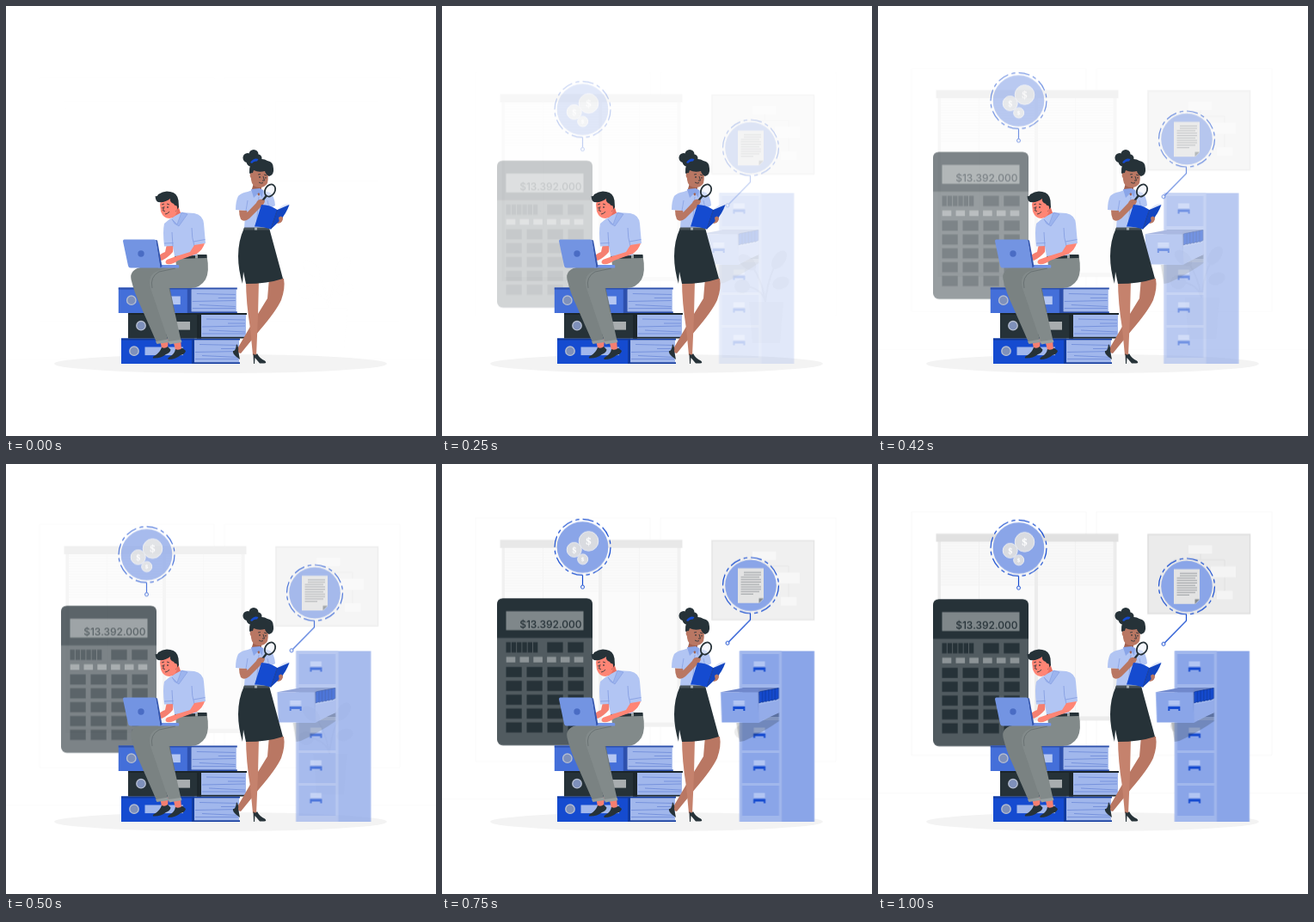
An HTML page that plays this animation: 500x500 px, repeating every 1040 ms.

```html
<!DOCTYPE html>
<html lang="en">
<head>
<meta charset="utf-8">
<title>Accounting office</title>
<style>
  html, body { margin: 0; width: 100%; height: 100%; overflow: hidden; background: #fff; }
  svg { display: block; width: 100vw; height: 100vh; }
  .slide { opacity: 0; }
  .sum { font: 500 12px Inter, "Open Sans", sans-serif; fill: #263238; }
  .coin { font-family: "Noto Serif", "Liberation Serif", serif; font-weight: 600; fill: #fff; text-anchor: middle; }
</style>
</head>
<body>
<svg viewBox="0 0 500 500">
  <g id="room" class="slide">
    <g fill="none" stroke="#f6f6f6" stroke-width=".8">
      <path d="M39 55H242V338H39ZM254 55H458V338H254ZM0 382H500"/>
    </g>
    <rect x="69.5" y="88" width="208" height="210" fill="#ececec"/>
    <path d="M73 90H182V293H73ZM186 90H273.500V293H186Z" fill="#fafafa"/>
    <path d="M117.500 90V293M229.500 90V293" stroke="#f1f1f1"/>
    <g id="blinds" stroke="#f0f0f0" stroke-width=".8"></g>
    <rect x="67.500" y="80.500" width="212" height="9.500" fill="#e1e1e1"/>
    <rect x="314" y="81.500" width="118.500" height="92" fill="#ebebeb" stroke="#dedede" stroke-width="1.500"/>
    <path d="M375 104V111H403V147M375 111H344V124" fill="none" stroke="#e0e0e0"/>
    <path d="M361 94H388.500V104H361ZM387 118.500H416V131.500H387ZM394 147H412.500V157H394Z" fill="#f4f4f4"/>
    <g fill="#e6e6e6">
      <path d="M357 322H397L393 370H361Z" fill="#f0f0f0"/>
      <path d="M376 322Q371 288 350 268M376 322Q380 285 396 266M376 322Q372 304 346 303" fill="none" stroke="#e6e6e6" stroke-width="2"/>
      <ellipse cx="349" cy="304" rx="9" ry="8"/>
      <ellipse cx="355" cy="276" rx="12" ry="7" transform="rotate(40 355 276)"/>
      <ellipse cx="392" cy="273" rx="12" ry="7" transform="rotate(-55 392 273)"/>
      <ellipse cx="394" cy="300" rx="10" ry="7" transform="rotate(-20 394 300)"/>
    </g>
  </g>

  <ellipse cx="249.500" cy="416" rx="193.500" ry="11" fill="#f3f3f3"/>

  <g id="calc" class="slide">
    <rect x="64" y="157.500" width="111" height="171" rx="7" fill="#515b60"/>
    <path d="M64 203.500V164.500Q64 157.500 71 157.500H168Q175 157.500 175 164.500V203.500Z" fill="#263238"/>
    <rect x="74.500" y="172.500" width="90" height="22" fill="#7f878a"/>
    <text class="sum" x="162.500" y="192" text-anchor="end">$13.392.000</text>
    <g id="keys" fill="#263238"></g>
  </g>

  <g id="cabinet" class="slide">
    <rect x="344.700" y="217.500" width="87" height="198.500" fill="#8aa5e8"/>
    <rect x="344.700" y="217.500" width="49" height="198.500" fill="#a1b7ec"/>
    <g id="drawers"></g>
    <path d="M348 260H390.500V294H348Z" fill="#6f86c4"/>
    <path d="M344.700 323L341 301H367L390.500 288V299Q372 312 350 322Z" fill="#263238" opacity=".25"/>
    <path d="M367 269L390.500 260.500V289L367 300Z" fill="#a1b7ec"/>
    <path d="M367 300L390.500 289V275L367 280Z" fill="#94ace9"/>
    <g id="files" fill="#154bd0" stroke="#0f3798" stroke-width=".7"></g>
    <path d="M322.700 265.300H366L367.500 300.500H324Z" fill="#8aa5e8"/>
    <path d="M322.700 265.300L348 260.500H368L366 265.300Z" fill="#7088cc"/>
    <g id="openPull"></g>
  </g>

  <g id="folders"></g>

  <g id="man">
    <path d="M179 388L189 387L188 398H181ZM194 388L203 387L204 400H197Z" fill="#f57f70"/>
    <path d="M181 397Q185 399 188 396L191.500 399.500Q191 403 186 405Q180 410 171 409.500Q170 408 173 406.500Q179 403 181 397ZM197 399Q201 401 205 397.500L209 401Q208 405 203 406Q197 411 189 411Q187 410 190 408Q196 405 197 399Z" fill="#263238"/>
    <path d="M200 303L160 303Q143 306 145.500 318Q149 333 157 350L175 391L188 389L180 350L184 326H215Z" fill="#7a8282"/>
    <path d="M174 390L188.500 387.500L189 391L175.500 393Z" fill="#949b9b"/>
    <path d="M197 292L233.500 290Q237 309 232 318Q226 328 214 328H190L203.500 389L189.500 391.500L168 328Q164 312 177 308Q188 303 198 303Z" fill="#828a8a"/>
    <path d="M188.500 390L203.500 388L204.500 391L190 393.500Z" fill="#9aa1a1"/>
    <path d="M190 328L196 356M170 328Q167 315 178 309L197 305" fill="none" stroke="#646d6e" stroke-width=".8"/>
    <path d="M196 289H233.500V293L196.500 294Z" fill="#263238"/>
    <path d="M220 288.500H223V293.500H220Z" fill="#9aa1a1"/>
    <path d="M191 237L200 232L205 246L200 254L194 249Z" fill="#e96f62"/>
    <path d="M195 276L194 286Q188 293 181 296L176 293Q179 288 185 286L187 277Z" fill="#f57f70"/>
    <path d="M190 248Q198 243 204 240L219 241Q229 243 230 253L232 276L219 279L222 290L196 291L194 279L184 279.500Q182 262 184 253Z" fill="#b2c5f3"/>
    <path d="M194 279.500L193 263M184 276L194.500 275.500M216 258Q216 270 219 279M218 274L231.500 271.500" fill="none" stroke="#829be0" stroke-width=".8"/>
    <path d="M193 248L199 254L204 240L211 242L201 256L196 253Z" fill="#9cb4ee" stroke="#829be0" stroke-width=".6"/>
    <path d="M219 278L231 276Q229 283 222 288L200 296Q194 301 187 300Q184 298 187 295L198 291L214 286Z" fill="#ff8575"/>
    <path d="M179 231Q179 226 186 224L197 224L199 237Q198 246 190 247Q183 247 180 239Z" fill="#ff8575"/>
    <path d="M173.500 221Q176 222 177 219Q184 214 191 216Q199 217 200.500 226L201 234L197 239Q198 234 195 230Q190 228 191 224Q185 229 177 228Q174 227 173.500 221Z" fill="#263238"/>
    <ellipse cx="196.500" cy="235" rx="2.600" ry="3.200" fill="#ff8575"/>
    <path d="M181 231L184 230M187 230L190 231M184 233L182.500 238L185 238.500M185 242Q188 242 190 239" fill="none" stroke="#263238" stroke-width=".8"/>
    <path d="M188 233V235M182 234V235.500" stroke="#263238" stroke-width="1.100"/>
    <path d="M177 304.500L180 301H200Q202 301 201 304.500Z" fill="#7394e8"/>
    <path d="M174 272L176 272.500L181.500 303L179 304.500Z" fill="#3556ad"/>
    <path d="M137.500 271.500H172.500Q174 271.500 174.500 273L179.500 304.500H145Q142.500 304.500 142 302L136 273.500Q136 271.500 137.500 271.500Z" fill="#7394e2"/>
    <circle cx="157" cy="288" r="3.700" fill="#4a6cc4"/>
  </g>

  <g id="woman">
    <path d="M306 316L323 317Q325 328 320 342Q314 355 295 377L273 404L267 402L285 371L304 340Z" fill="#b97763"/>
    <path d="M279 318H294L293 360L291 407L287 406L284 375Q279 345 279 318Z" fill="#c5826d"/>
    <path d="M268 393Q271 397 270 401L272 411L268 408Q263 404 264 401Q267 402 268 393ZM287.500 404Q290 407 292 404Q295 410 301 412.500Q304 415 300 415.500H295L289.500 409L289 416H288Z" fill="#263238"/>
    <path d="M277 258H306Q312 280 322 317Q304 323 279 323L276 309L275 323Q270 306 270 291Q270 273 277 258Z" fill="#263238"/>
    <path d="M288 206L297 207L297 222L289 226L285 216Z" fill="#a2614f"/>
    <path d="M281 216Q287 214 288 213L294 221L298 214L307 217Q312 220 313 232L306 236L306 258H277L278 245L279 238L267 237Q267 227 270 221Q274 217 281 216Z" fill="#b2c5f3"/>
    <path d="M279 238L281 226M306 236L304 226M294 222L291 257" fill="none" stroke="#829be0" stroke-width=".7"/>
    <path d="M285 213L288 223L294 217L298 223L299 214L295 212Z" fill="#8aa5e8"/>
    <path d="M277 257.500H306V260.500H276Z" fill="#465157"/>
    <path d="M289 257.500H292V260.500H289Z" fill="#a9b0b2"/>
    <path d="M271 237.500L280 238L280.500 240L291 229Q293 224 299 225Q302 227 299 231L283 247Q277 252 273 248Q271 244 271 237.500Z" fill="#b97763"/>
    <ellipse cx="307" cy="214.500" rx="5.600" ry="7.500" transform="rotate(32 307 214.500)" fill="#eef2fb" fill-opacity=".55" stroke="#263238" stroke-width="1.800"/>
    <path d="M302.500 221L297 228" stroke="#263238" stroke-width="2.400" stroke-linecap="round"/>
    <path d="M296 225L301 226L300 229L295 232Z" fill="#b97763"/>
    <path d="M316 245Q321 242 322 246Q322 252 316 253L313 250Z" fill="#b97763"/>
    <path d="M315.500 237Q322 230 328.500 230L329 233L315 246Z" fill="#dfe6f8"/>
    <path d="M297 231Q307 231 315.500 237L308 259.500Q298 256 289 256.500Z" fill="#154bd0"/>
    <path d="M315.500 237L329.500 231Q326 241 319 249Q314 254 308 259.500Z" fill="#1245c0"/>
    <path d="M315.500 237L308 259.500" stroke="#0d318c" stroke-width=".8"/>
    <path d="M317 246Q320 243 321.500 246Q322 251 318 252Z" fill="#b97763"/>
    <path d="M284 191L303 190Q306 197 304 206Q301 211 295 211Q286 211 285 202Z" fill="#b97763"/>
    <g fill="#263238">
      <circle cx="281" cy="176.500" r="5.500"/><circle cx="288" cy="172.500" r="5.500"/><circle cx="293" cy="177" r="4.500"/><circle cx="285" cy="181" r="5.500"/>
      <path d="M283 194Q282 184 290 180Q298 176 304 180Q311 181 311 189Q312 196 306 198Q302 196 301 192Q294 194 288 191Q287 195 285 197Z"/>
    </g>
    <path d="M284 182Q288 176 293.500 178L292 180.500Q288 180 286 183Z" fill="#154bd0"/>
    <ellipse cx="286" cy="197" rx="2.300" ry="3" fill="#b97763"/>
    <path d="M293 196L296 195.500M300 196L303 197M299 198L300.500 203L298 203M294 205Q297 207 299 205.500" fill="none" stroke="#263238" stroke-width=".8"/>
    <path d="M295 198V200M302 199V200.500" stroke="#263238" stroke-width="1.100"/>
  </g>

  <g id="coins" class="slide">
    <circle cx="163.500" cy="98" r="29.800" fill="#8aa5e8"/>
    <circle cx="163.500" cy="98" r="32.500" class="ring"/>
    <g id="money"></g>
    <path d="M163.500 130.500V142" stroke="#154bd0" stroke-width="1.200"/>
    <circle cx="163.500" cy="144.300" r="2" fill="#fff" stroke="#154bd0"/>
  </g>

  <g id="paper" class="slide">
    <circle cx="359" cy="142.500" r="29.800" fill="#8aa5e8"/>
    <circle cx="359" cy="142.500" r="32.500" class="ring"/>
    <path d="M344 122.500H374V158L369 163H344Z" fill="#e3e3e3"/>
    <path d="M374 157.500L368.500 163V157.500Z" fill="#858b90"/>
    <g id="lines" stroke="#92979a" stroke-width=".9"></g>
    <path d="M358.500 175V182.500L333.500 208" fill="none" stroke="#154bd0" stroke-width="1.200"/>
    <circle cx="332" cy="209.500" r="2" fill="#fff" stroke="#154bd0"/>
  </g>
</svg>
<script>
const $ = id => document.getElementById(id);
const fill = (id, markup) => { $(id).innerHTML = markup; };
const rect = (x, y, w, h, extra = "") =>
  `<rect x="${x}" y="${y}" width="${w}" height="${h}" ${extra}/>`;
const line = (x1, y1, x2, y2, extra = "") =>
  `<path d="M${x1} ${y1}L${x2} ${y2}" ${extra}/>`;
const repeat = (n, make) => Array.from({ length: n }, (_, i) => make(i)).join("");

fill("blinds", repeat(17, i =>
  line(73, 92 + i * 3, 182, 92 + i * 3) + line(186, 92 + i * 3, 273, 92 + i * 3)));

fill("keys",
  repeat(6, i => rect(74.5 + i * 6.3, 208.5, 5.3, 12)) +
  [122.3, 146.3].map(x => rect(x, 208.5, 18.3, 12)).join("") +
  repeat(6, i => rect(74.7 + i * 15.8, 225.5, 10.6, 6.5, 'fill="#8d9497"')) +
  repeat(20, i => rect(74.5 + i % 4 * 24, 237.3 + Math.floor(i / 4) * 16.1, 18.2, 11.8)));

const pull = (x, y) =>
  rect(x - 6.5, y - 7, 13, 5.5, 'fill="#b2c5f3"') +
  `<path d="M${x - 7} ${y}H${x + 7}V${y + 5}H${x + 5}V${y + 3}H${x - 5}V${y + 5}H${x - 7}Z" fill="#154bd0"/>`;
fill("drawers", [221, 298, 336, 374].map(y =>
  rect(347.7, y, 42.8, 35, 'fill="#8aa5e8"') + pull(367.7, y + 15.5)).join(""));
fill("openPull", pull(344, 282));
fill("files", repeat(6, i => {
  const x = 367.5 + i * 3.7, y = 265 - i * .7;
  return `<path d="M${x} ${y}L${x + 4} ${y - 1}V${y + 11}L${x} ${y + 13}Z"/>`;
}));

const folder = (x, y, spine, color, dark, label) =>
  rect(x, y, 82, 29.5, `fill="${color}"`) +
  rect(x + spine, y, 85 - spine, 29.5, `fill="${dark}"`) +
  rect(x + 85, y + 2, 52, 26, 'fill="#a1b7ec"') +
  [[7, 8, 5], [12, 12, 30], [16, 15, 0], [20, 22, 8], [24, 24, 0]].map(([a, b, cut]) =>
    line(x + 86 + cut, y + a, x + 136, y + b, 'stroke="#6c89d8" stroke-width=".8"')).join("") +
  rect(x, y, 138, 2, `fill="${dark}"`) + rect(x + 82, y + 27.8, 56, 1.7, `fill="${dark}"`) +
  `<circle cx="${x + 15}" cy="${y + 14.7}" r="5.2" fill="#7e90bb" stroke="#b4bdd0" stroke-width="1.4"/>` +
  rect(x + 27.5, y + 10, 44.5, 9.6, `fill="${label}"`);
fill("folders",
  folder(134, 386.5, 82, "#154bd0", "#103a9f", "#a1b7ec") +
  folder(142, 357, 80, "#263238", "#1c262b", "#a8adaf") +
  folder(130.8, 327.5, 80, "#446fd9", "#2d50ad", "#b4c6f2"));

fill("money", [[170.5, 91, 11.8, 13], [153.7, 101, 9, 10], [163.7, 112, 6.5, 7.5]].map(([x, y, r, size]) =>
  `<circle cx="${x}" cy="${y}" r="${r - .5}" fill="#d9dbe0" stroke="#eceef3"/>` +
  `<text class="coin" x="${x}" y="${y + size * .36}" font-size="${size}">$</text>`).join(""));

fill("lines", repeat(10, i => {
  const y = 127.3 + i * 2.8;
  return line(i < 2 ? 351 : 347.5, y, i % 3 === 2 ? 369 : i === 9 ? 362 : 371, y);
}));

document.querySelectorAll(".ring").forEach(ring => {
  for (const [key, value] of Object.entries({
    fill: "none", stroke: "#154bd0", "stroke-width": 1.2, "stroke-dasharray": "13 4 4.5 4"
  })) ring.setAttribute(key, value);
});

// Cubic Bézier easing, solved by bisection
const bezier = (x1, y1, x2, y2) => x => {
  const at = (a, b, s) => 3 * a * s * (1 - s) ** 2 + 3 * b * s * s * (1 - s) + s ** 3;
  let low = 0, high = 1;
  for (let i = 0; i < 30; i++) {
    const mid = (low + high) / 2;
    if (at(x1, x2, mid) < x) low = mid; else high = mid;
  }
  return at(y1, y2, low);
};
const overshoot = bezier(.36, -.01, .5, 1.38);
const linear = x => x;

const LOOP = 1040, STEPS = 25;
function slide(id, dx, dy, ease) {
  const frames = Array.from({ length: STEPS + 1 }, (_, i) => {
    const step = Math.min(i, STEPS - 1);
    const p = ease((step + .65) / STEPS);
    return {
      offset: i < STEPS ? Math.round(i * 25 / 6) * 10 / LOOP : 1,
      opacity: Math.max(0, Math.min(1, p)),
      transform: `translate(${dx * (1 - p)}px, ${dy * (1 - p)}px)`,
      easing: "step-end"
    };
  });
  $(id).animate(frames, { duration: LOOP, iterations: Infinity });
}

slide("room", 0, 30, linear);
slide("calc", 0, 30, overshoot);
slide("cabinet", -30, 0, overshoot);
slide("coins", 0, 30, overshoot);
slide("paper", 0, 30, overshoot);
</script>
</body>
</html>
```
